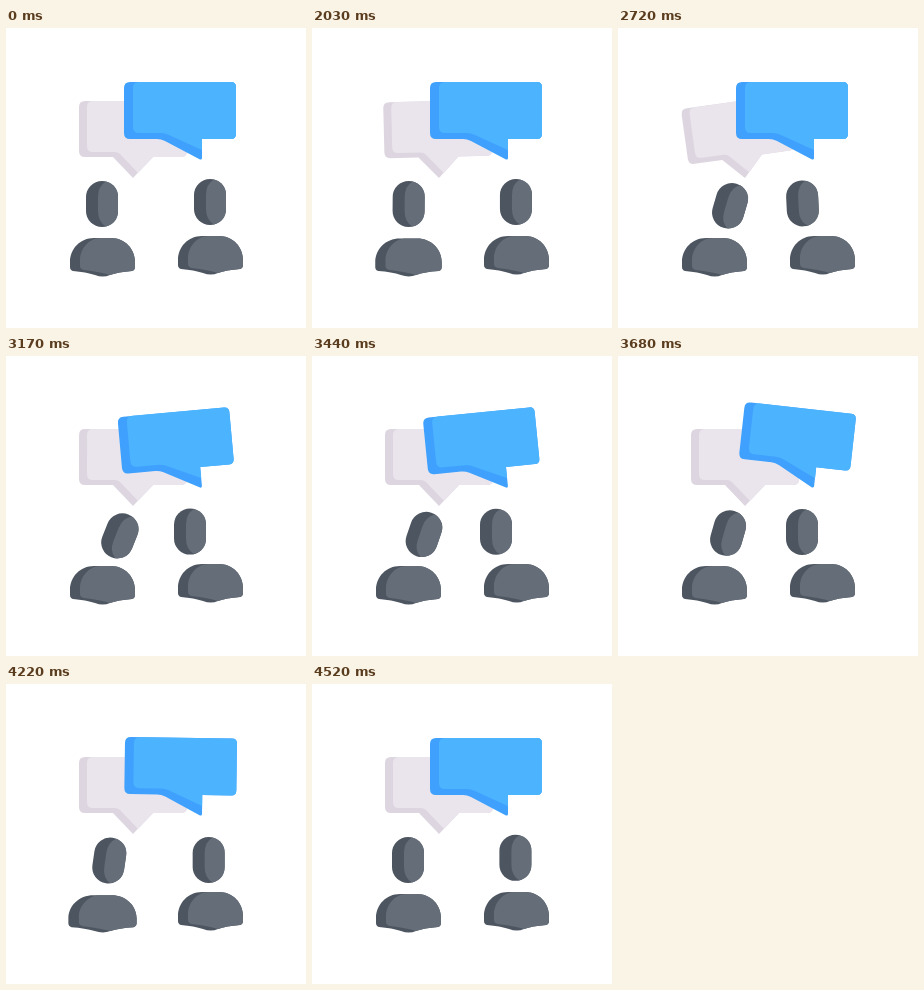
Write an HTML page with a canvas that moves like this. It is 300x300 px and loops after 4.55 s.

```html
<!DOCTYPE html>
<html lang="en">
<head>
<meta charset="utf-8">
<title>Conversation</title>
<style>
  html, body { margin: 0; width: 100%; height: 100%; overflow: hidden; background: #fff; }
  canvas { display: block; width: 300px; height: 300px; }
</style>
</head>
<body>
<canvas id="stage" width="300" height="300"></canvas>
<script>
const ctx = document.getElementById('stage').getContext('2d');
const LOOP = 4550;
const GREY = { light: '#eae5ed', dark: '#ddd6e0' };
const BLUE = { light: '#4cb4ff', dark: '#3fa1fd' };
const SLATE = { light: '#646d78', dark: '#4d5560' };

// Shapes, in stage coordinates at rest
const greyBubble = {
  colors: GREY, pivot: [127, 150],
  outline: 'M79 73H175Q181 73 181 79V123Q181 129 175 129H147L127 150L107 129H79Q73 129 73 123V79Q73 73 79 73Z',
  face: 'M87 73H175Q181 73 181 79V123Q181 129 175 129H147L132 145L114 126Q112 124 109 124H87Q81 124 81 118V79Q81 73 87 73Z'
};
const blueBubble = {
  colors: BLUE, pivot: [195, 131],
  outline: 'M124 54H225Q230 54 230 59V106Q230 111 225 111H196V130Q196 132 194 131.500L159 113Q155 111 151 111H124Q118 111 118 105V60Q118 54 124 54Z',
  face: 'M133 54H225Q230 54 230 59V106Q230 111 225 111H196V122L163 107Q159 105 155 105H133Q127 105 127 99V60Q127 54 133 54Z'
};
const head = {
  colors: SLATE, pivot: [96, 176],
  outline: 'M80 169A16 16 0 0 1 112 169V183A16 16 0 0 1 80 183Z',
  face: 'M100 153.500Q112 157 112 169V183Q112 195 100 198.500Q92 194 92 183V169Q92 158 100 153.500Z'
};
const body = {
  colors: SLATE, pivot: [96.5, 248],
  outline: 'M88 210H105C119 210 129 221 129 234V239Q129 242 126 243Q112 244 104 247Q97 250 89 247Q80 244 67 243Q64 242 64 239V234C64 221 74 210 88 210Z',
  face: 'M94 210H105C119 210 129 221 129 234V239Q129 242 126 243Q112 244 104 247Q94 244 78 242Q74 241 74 238V232C74 221 83 210 94 210Z'
};
for (const shape of [greyBubble, blueBubble, head, body]) {
  shape.outline = new Path2D(shape.outline);
  shape.face = new Path2D(shape.face);
}

// Poses: time, x, y, degrees
const leftHead = [
  [1980, 0, 0, 0], [2360, 14.5, 0, 11], [3000, 17, 3, 20], [3230, 18, 4, 22],
  [3640, 14, 1, 16], [4050, 14, 1, 16], [4400, 0, 0, 0]
];
const rightHead = [
  [2020, 0, 0, 0], [2340, -18, 1, -12], [2900, -20, 1.5, 0],
  [3850, -20, 2, 0], [4100, -1.5, 2.5, 0], [4550, -0.6, -0.2, 0]
];
const SWINGS = [0, -20, 12, -8, 2.5, 0];
const BLUE_SWINGS = [0, -20, 15, -8, 2.5, 0];

const ease = u => (1 - Math.cos(Math.PI * u)) / 2;

function poseAt(t, keys) {
  if (t <= keys[0][0]) return keys[0].slice(1);
  const next = keys.findIndex(key => key[0] > t);
  if (next < 0) return keys[keys.length - 1].slice(1);
  const a = keys[next - 1], b = keys[next];
  const k = ease((t - a[0]) / (b[0] - a[0]));
  return [1, 2, 3].map(i => a[i] + (b[i] - a[i]) * k);
}

function swing(t, start, phase, angles) {
  const p = (t - start) / phase;
  if (p <= 0 || p >= angles.length - 1) return 0;
  const i = Math.floor(p);
  return angles[i] + (angles[i + 1] - angles[i]) * ease(p - i);
}

function pulse(t, start, length) {
  const u = (t - start) / length;
  return u > 0 && u < 1 ? Math.sin(Math.PI * u) : 0;
}

function draw(shape, x, y, degrees, sx = 1, sy = 1) {
  const [px, py] = shape.pivot;
  ctx.save();
  ctx.translate(px + x, py + y);
  ctx.rotate(degrees * Math.PI / 180);
  ctx.scale(sx, sy);
  ctx.translate(-px, -py);
  ctx.fillStyle = shape.colors.dark;
  ctx.fill(shape.outline);
  ctx.fillStyle = shape.colors.light;
  ctx.fill(shape.face);
  ctx.restore();
}

function person(x, y, pose, squash) {
  draw(head, x + pose[0], y + pose[1], pose[2]);
  draw(body, x, y, 0, 1 + 0.06 * squash, 1 - 0.04 * squash);
}

function render(t) {
  ctx.fillStyle = '#fff';
  ctx.fillRect(0, 0, 300, 300);
  draw(greyBubble, 0, 0, swing(t, 1990, 240, SWINGS));
  draw(blueBubble, 0, 0, swing(t, 3088, 245, BLUE_SWINGS));
  person(0, 0, poseAt(t, leftHead), pulse(t, 2000, 250) + pulse(t, 4050, 250));
  person(108, -2, poseAt(t, rightHead), pulse(t, 2060, 240) + pulse(t, 3900, 240));
}

const begin = performance.now();
function tick() {
  render((performance.now() - begin) % LOOP);
  requestAnimationFrame(tick);
}
tick();
</script>
</body>
</html>
```
